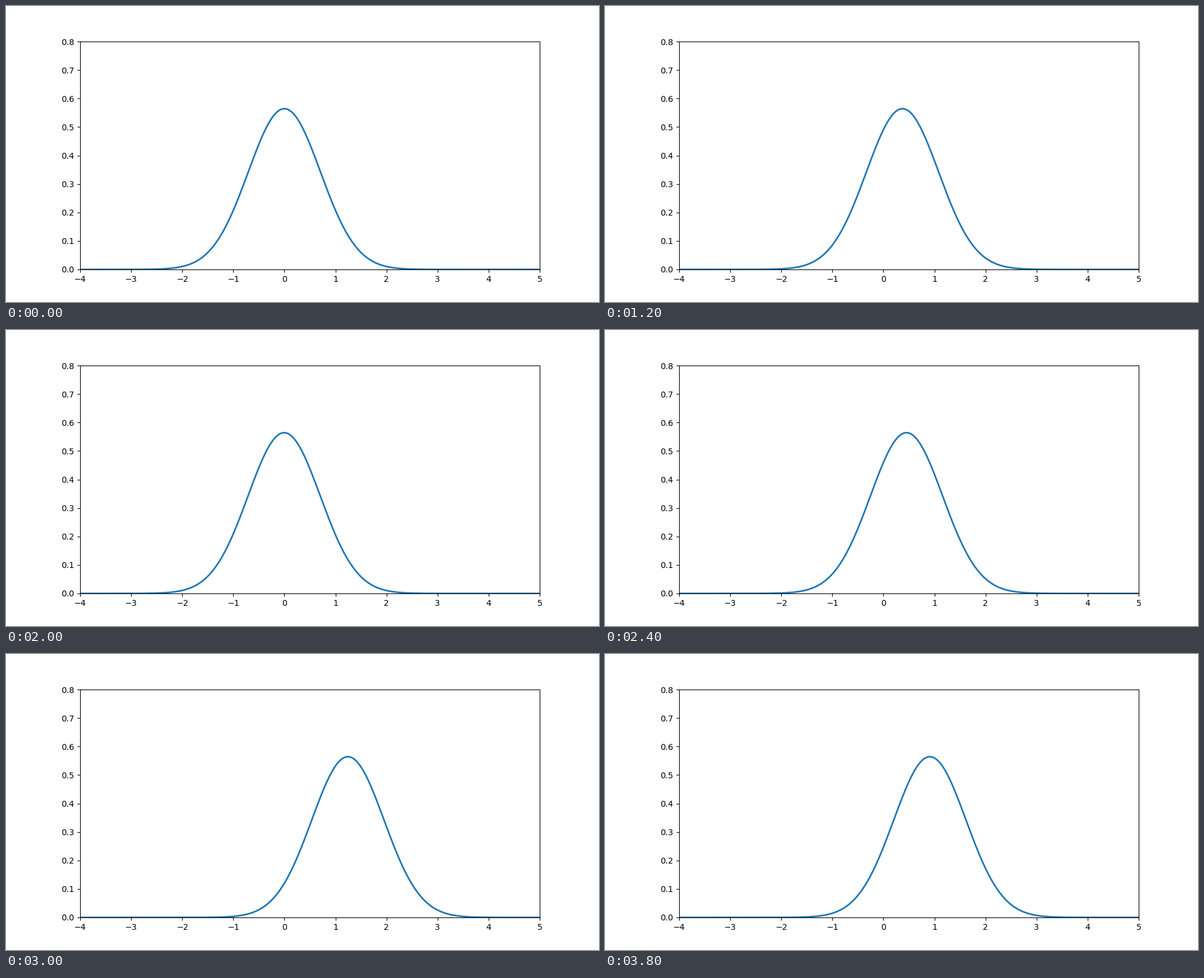
Animation, 1000 px wide and 500 px high, one loop 4 s. Source, as a matplotlib script:

```python
import numpy as np
import matplotlib.pyplot as plt
from matplotlib.animation import FuncAnimation

FRAMES = 20
INTERVAL = 200  # ms

x = np.linspace(-4, 5, 1000)


def center(i):
    """Steady drift plus a harmonic swing."""
    return 0.05 * i + 0.5 / 0.95 * np.sin(0.5 * i)


def density(i):
    return np.exp(-(x - center(i)) ** 2) / np.sqrt(np.pi)


fig, ax = plt.subplots(figsize=(10, 5), dpi=100)
ax.set_xlim(-4, 5)
ax.set_ylim(0, 0.8)
line, = ax.plot(x, density(0), color="#1f77b4", lw=2)


def update(i):
    line.set_ydata(density(i))
    return line,


anim = FuncAnimation(fig, update, frames=FRAMES, interval=INTERVAL,
                     init_func=lambda: update(0), repeat=True,
                     repeat_delay=0)

plt.show()
```
